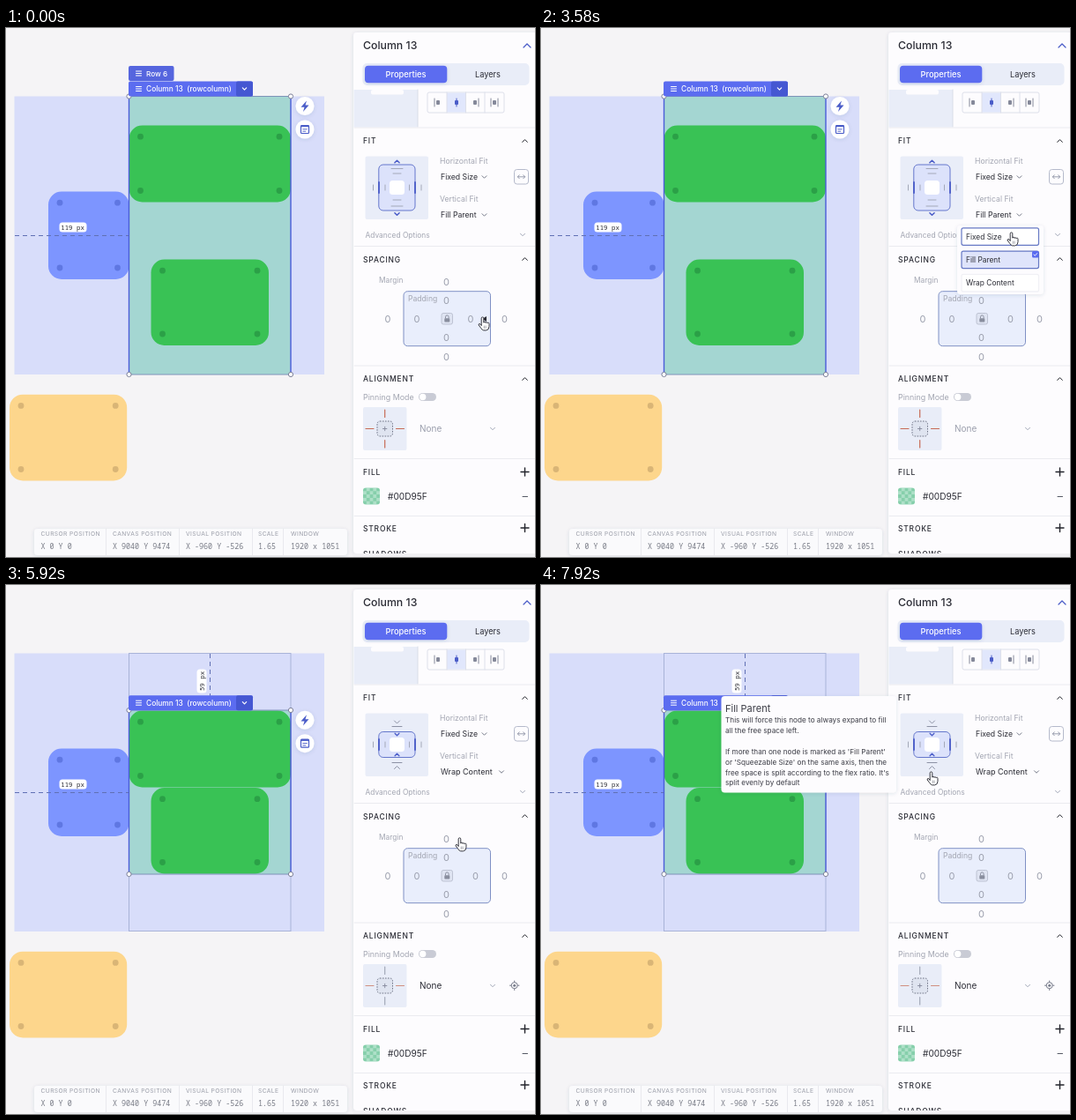
Animation of 600x600 px, one loop 8 s. Source, as an HTML page:

```html
<!DOCTYPE html>
<html lang="en">
<head>
<meta charset="utf-8">
<title>Column fit editor</title>
<style>
html, body { margin: 0; width: 100%; height: 100%; overflow: hidden; background: #f5f4f6; }
svg { display: block; width: 100vw; height: 100vh; font: 8.7px Inter, "Open Sans", sans-serif; fill: #2b2c35; }
text { white-space: pre; }
.head { font-size: 8.5px; font-weight: 500; letter-spacing: .8px; }
.soft { fill: #a3a6b2; }
.zero { font-size: 11px; fill: #9a9eac; text-anchor: middle; }
.mono { font: 8.4px "Noto Sans Mono", monospace; fill: #777a85; }
.caption { font-size: 6.7px; letter-spacing: .4px; fill: #9a9da8; }
.pill { font: 500 7.4px "Noto Sans Mono", monospace; text-anchor: middle; }
.tip { font-size: 8.2px; fill: #3b3c45; }
.title { font-size: 11px; fill: #3b3c45; }
.line { fill: none; stroke-linecap: round; stroke-linejoin: round; }
</style>
</head>
<body>
<svg id="stage" viewBox="0 0 600 600"></svg>
<script>
const BLUE = '#5b6cf0', INK = '#4a5cc8', PALE = '#e9edf8', GREY = '#a3a8b8';

// Markup helpers
const box = (x, y, w, h, fill, r = 0, more = '') =>
  `<rect x="${x}" y="${y}" width="${w}" height="${h}" rx="${r}" fill="${fill}" ${more}/>`;
const text = (x, y, words, cls = '', more = '') => `<text x="${x}" y="${y}" class="${cls}" ${more}>${words}</text>`;
const line = (d, color = GREY, width = 1, more = '') =>
  `<path class="line" d="${d}" stroke="${color}" stroke-width="${width}" ${more}/>`;
const dashes = d => line(d, '#6070b4', 1, 'stroke-dasharray="5 4" style="stroke-linecap:butt"');
const group = (id, body, more = '') => `<g id="${id}" ${more}>${body}</g>`;
const chevron = (x, y, dir = 1, color = '#777b8a', size = 2.5, width = 1) =>
  line(`M${x - size} ${y - dir * size / 2}l${size} ${dir * size}l${size} ${-dir * size}`, color, width);
const plus = (x, y, r, color, width) => line(`M${x - r} ${y}h${2 * r}M${x} ${y - r}v${2 * r}`, color, width);
const dot = (x, y, r, fill, more = '') => `<circle cx="${x}" cy="${y}" r="${r}" fill="${fill}" ${more}/>`;
const outline = (color, width = 1) => `stroke="${color}" stroke-width="${width}"`;
const shadow = 'filter="url(#shadow)"';

function card(x, y, w, h, fill, dotFill) {
  const dots = [[13, 12.7], [w - 13, 12.7], [13, h - 13], [w - 13, h - 13]];
  return box(x, y, w, h, fill, 15) + dots.map(([dx, dy]) => dot(x + dx, y + dy, 3.4, dotFill)).join('');
}

function selection(top, bottom) {
  const corners = [[139.5, top], [323, top], [139.5, bottom], [323, bottom]];
  return line(`M139.5 ${top}H323M139.5 ${bottom}H323`, '#7f92b8') +
    line(`M139.5 ${top}V${bottom}M323 ${top}V${bottom}`, '#4a5cd8', 1.4) +
    corners.map(([x, y]) => dot(x, y, 2.6, '#fff', outline('#7d8199'))).join('');
}

const burger = (x, y) => line(`M${x} ${y - 2.5}h6M${x} ${y}h6M${x} ${y + 2.5}h6`, '#fff');
const measure = (x, y, words, turn = 0) => `<g transform="translate(${x} ${y}) rotate(${turn})">` +
  box(-15 + (turn ? 1.5 : 0), -5.5, turn ? 27 : 31, 11, '#fff', 3.5) + text(0, 2.7, words, 'pill') + '</g>';

const columnTools = group('tools',
  box(139, 60.5, 141, 17, BLUE, 2) + box(261, 60.5, 19, 17, '#4557d2', 2) + burger(147.5, 69) +
  text(159, 72, 'Column 13  (rowcolumn)', '', 'fill="#fff" style="font-size:8.4px;font-weight:500"') +
  chevron(270.5, 69, 1, '#fff', 2.2, 1.2) +
  dot(339, 88.5, 10.5, '#fff', shadow) + dot(339, 115, 10.5, '#fff', shadow) +
  `<path d="M341 82.5l-6.5 7.2h4l-1.5 5.2l6.5-7.4h-4z" fill="${INK}"/>` +
  box(334.5, 110.5, 9, 9, 'none', 1, outline(INK, 1.2)) + box(334.5, 110.2, 9, 2, INK) +
  line('M336.8 114.8h4.5M336.8 117.2h3', INK, .9));

const canvas =
  box(9.5, 77.5, 351.5, 315.5, '#d8ddfa') +
  card(48, 185.5, 91.5, 99.5, '#7d95ff', '#5f77e2') +
  card(4, 415.7, 133.2, 97.8, '#fdd68c', '#d9b576') +
  group('fillColumn', box(139.5, 77.5, 183.5, 315.5, '#a4d6d2')) +
  group('wrapColumn',
    box(139.5, 77.5, 183.5, 315, 'none', 0, outline('#a9b3d8')) +
    dashes('M231.5 78V126') +
    measure(222, 109, '59 px', -90) + box(139.5, 142, 183.5, 186, '#a4d6d2')) +
  group('cardA', card(139.5, 110.5, 183.5, 87, '#39c255', '#2ba047')) +
  group('cardB', card(164.5, 262.5, 133.5, 97.5, '#39c255', '#2ba047')) +
  dashes('M10 235.5H139') + measure(75.5, 226, '119 px') +
  group('fillFrame', selection(77.5, 393)) + group('wrapFrame', selection(142, 328)) +
  columnTools +
  group('rowLabel', box(139, 43, 51.5, 17, '#5565de', 2) + burger(147.5, 51.5) +
    text(159, 54.5, 'Row 6', '', 'fill="#fff" style="font-size:8.2px;font-weight:500"'));

const status = [[39.5, 'CURSOR POSITION', 'X 0 Y 0'], [121, 'CANVAS POSITION', 'X 9040 Y 9474'],
  [204, 'VISUAL POSITION', 'X -960 Y -526'], [286, 'SCALE', '1.65'], [323, 'WINDOW', '1920 x 1051']];
const statusBar = box(32, 568, 355, 30, '#fafafc', 4, shadow) +
  line('M113.5 568V598M196.5 568V598M279.5 568V598M314.5 568V598', '#e9e9ee') +
  status.map(([x, name, value]) => text(x, 576, name, 'caption') + text(x, 591, value, 'mono')).join('');

const fitSketch = (top, height) =>
  box(422.8, top, 41.2, height, '#dce2fb', 5, outline('#6577cc')) +
  box(435, 173, 17, 16, '#fff', 3.5) +
  line('M416.5 178v6M430 178v6M457.5 178v6M471 178v6') +
  line('M423 175v12M464 175v12', INK, 1.8);

const fitWidget = box(407.5, 145.5, 71.5, 71.5, PALE, 2) +
  group('fillSketch', fitSketch(155, 52) + line('M437 159.5h13M439 165h9M439 195h9M437 202h13') +
    chevron(443.5, 151.5, -1, INK, 2.6, 1.5) + chevron(443.5, 211, 1, INK, 2.6, 1.5)) +
  group('wrapSketch', fitSketch(166.5, 29) + line('M438 160.5h11M438 201.5h11', '#8d92a5') +
    chevron(443.5, 155.5, 1, '#8d92a5', 3) + chevron(443.5, 207, -1, '#8d92a5', 3) +
    chevron(443.5, 169.5, 1, INK, 2.4, 1.3) + chevron(443.5, 192.5, -1, INK, 2.4, 1.3));

const headings = [['FIT', 128], ['SPACING', 262.5], ['ALIGNMENT', 398], ['FILL', 503.5], ['STROKE', 567.5], ['SHADOWS', 597]];
const zeros = [[499.5, 288], [433, 330], [565.5, 330], [499.5, 373], [499.5, 309], [466, 330], [499.5, 351]];
const alignCell = (x, i) => {
  const color = i === 1 ? INK : '#85899a';
  const bar = [x - 3.5, x, x + 3.5, x - 4][i];
  return line(`M${bar} 80v9${i === 3 ? `M${x + 4} 80v9` : ''}`, color) +
    box(x - 2 + [.5, 0, -.5, 0][i], 82, 4, 5, color, 1);
};

const panel = box(394, 5, 210, 591, '#fdfcfe', 4, shadow) +
  text(405, 24, 'Column 13', '', 'style="font-size:12.3px;font-weight:500"') +
  chevron(591, 20, -1, INK, 4, 1.2) +
  box(404.5, 40, 189, 25, PALE, 5) + box(407, 42.7, 93.3, 19.6, BLUE, 4, shadow) +
  text(453.5, 55.8, 'Properties', '', 'fill="#fff" text-anchor="middle" style="font-size:9.3px;font-weight:500"') +
  text(546.5, 55.8, 'Layers', '', 'text-anchor="middle" style="font-size:9.2px"') +
  box(394.5, 70, 72.5, 42.5, PALE) + box(414, 70, 37, 5.5, '#fdfcfe', 2) + line('M467 70V112', '#d9dce8') +
  box(478, 73, 87, 23, '#fdfcfe', 2, outline('#dde0ea')) + box(500, 73.5, 21.5, 22, '#e1e7fc') +
  line('M500 73V96M521.5 73V96M543 73V96', '#dde0ea') +
  [489.5, 511, 532.5, 554].map(alignCell).join('') +
  line('M395 113H600M395 247.5H600M395 383H600M395 488.5H600M395 553.5H600', '#ebebf0') +
  headings.map(([name, y]) => text(405, y + 3.2, name, 'head')).join('') +
  [128, 262, 398].map(y => chevron(588.5, y, -1, '#23242c', 2.8)).join('') +
  [503.5, 567].map(y => plus(588.5, y, 4.5, '#23242c', 1.4)).join('') +
  fitWidget +
  box(487.5, 158, 66.5, 22, '#e9eefb', 2, 'id="hoverH"') + box(487.5, 201, 66.5, 22, '#e9eefb', 2, 'id="hoverV"') +
  text(492, 154, 'Horizontal Fit', 'soft') + text(493, 172, 'Fixed Size') + chevron(542.5, 169) +
  text(492, 197, 'Vertical Fit', 'soft') +
  group('fillValue', text(493, 215, 'Fill Parent') + chevron(542.5, 212)) +
  group('wrapValue', text(493, 215, 'Wrap Content', '', 'style="font-size:9px"') + chevron(562, 212)) +
  box(576.5, 160.5, 16, 16.5, 'none', 3, outline('#b5bacb')) +
  line('M580.5 168.8h8M582.3 166.8l-2 2l2 2M586.7 166.8l2 2l-2 2', '#8d92a5', .9) +
  text(407.5, 238, 'Advanced Options', 'soft', 'style="font-size:8.4px"') + chevron(586, 234.5, 1, GREY) +
  text(423, 288.5, 'Margin', 'soft', 'style="font-size:8.4px"') +
  box(451, 298.7, 98.5, 62, '#e9eefc', 4.5, outline('#7f90c4')) +
  text(456, 309.5, 'Padding', 'soft', 'style="font-size:8.6px"') +
  zeros.map(([x, y]) => text(x, y + 4, 0, 'zero')).join('') +
  text(532.5, 334, 0, 'zero', 'id="rightZero"') +
  group('handle', '<path d="M540 330l5-3v6z"/>') +
  box(494, 323.5, 12.5, 12.5, '#dfe4f2', 2, outline('#b4b9ca', .8)) +
  box(497.3, 329.3, 6, 4.2, '#898e9e', .8) + line('M498.5 329v-1.3a1.8 1.8 0 0 1 3.6 0v1.3', '#898e9e') +
  text(405, 421.5, 'Pinning Mode', 'soft', 'style="font-size:8.9px"') +
  box(468, 414, 20, 9, '#c9cbd5', 4.5) + dot(472.7, 418.5, 3.7, '#fff') +
  box(405, 430, 49.5, 49, PALE, 2) +
  line('M429.7 433v8.5M429.7 467.5v8.5', '#c76a55', 1.2, 'id="pinV"') +
  line('M408 454.5h9M442.5 454.5h9', '#c76a55', 1.2, 'id="pinH"') +
  box(421, 446, 17.5, 17, '#dfe4f0', 3, outline('#6f7486') + ' stroke-dasharray="1.6 1.4"') +
  plus(429.7, 454.5, 2.2, '#858a9c', .9) +
  text(469, 458, 'None', '', 'id="none" style="font-size:10px"') + chevron(552, 454.5, 1, GREY) +
  group('pinTarget', dot(576.7, 454.2, 3.5, 'none', outline('#777b8a')) + dot(576.7, 454.2, 1.5, '#777b8a') +
    line('M576.7 449v1.5M576.7 458v1.5M571.5 454.2h1.5M580.5 454.2h1.5', '#777b8a')) +
  box(405, 521.5, 19, 19, 'url(#checker)', 3) +
  text(433, 534.5, '#00D95F', '', 'style="font-size:10.1px"') + line('M586 531.5h5.5', '#555965') +
  box(394, 596, 206, 4, '#f1f0f3');

const options = ['Fixed Size', 'Fill Parent', 'Wrap Content'];
const optionTop = i => 226.8 + i * 26.3;
const menu = group('menu', box(472, 224, 98, 78, '#fdfcfe', 4, shadow) +
  options.map((name, i) => {
    const y = optionTop(i), chosen = i === 1;
    return box(477, y, 87.5, 19.5, chosen ? '#dfe4fb' : '#fff', 2, `class="option" stroke-width="1.2"`) +
      text(482, y + 12.8, name, '', 'style="font-size:8.4px"') +
      (chosen ? box(557, y, 7.5, 7.5, BLUE, 1.5) + line(`M559 ${y + 3.8}l1.3 1.4l2.3-2.7`, '#fff', .9) : '');
  }).join(''));

const wrapTip = group('wrapTip', box(273, 269, 197, 41, '#fdfcfe', 4, shadow) +
  line('M279 282.5h8M283 277.5v10M281.3 279.3l1.7 1.7l1.7-1.7M281.3 286l1.7-1.7l1.7 1.7', '#4b4e59', 1.1) +
  text(291.5, 286.5, 'Wrap Content', 'title') +
  text(278, 301, 'Will wrap this node to be the size of its children.', 'tip'));

const tipLines = ['This will force this node to always expand to fill', 'all the free space left.', '',
  "If more than one node is marked as 'Fill Parent'", "or 'Squeezable Size' on the same axis, then the",
  "free space is split according to the flex ratio. It's", 'split evenly by default'];
const parentTip = group('parentTip', box(204.5, 126, 198.5, 109.5, '#fdfcfe', 4, shadow) +
  text(209, 143.5, 'Fill Parent', 'title') +
  tipLines.map((words, i) => text(209, 156 + i * 11.9, words, 'tip')).join(''));

const hand = group('cursor', `<path fill="#fff" stroke="#34353e" stroke-linejoin="round"
  d="M-1.3 9.6V1.2a1.3 1.3 0 0 1 2.6 0V6.2a1.1 1.1 0 0 1 2.2.2a1.1 1.1 0 0 1 2.1.4a1 1 0 0 1 1.9.6V10.5q0 4-3.4 4.4H1.2q-1.6-.3-2.7-2.2L-4.3 9q-.4-1.4.9-1.6q1.1.2 2.1 2.2z"/>` +
  line('M1.8 10v2.5M3.6 10v2.5', '#6a6c78', .6));

const defs = `<defs>
  <filter id="shadow" x="-20%" y="-20%" width="140%" height="140%">
    <feDropShadow dx="0" dy="1" stdDeviation="2" flood-color="#3a3f60" flood-opacity=".13"/></filter>
  <pattern id="checker" x="405" y="521.5" width="7.6" height="7.6" patternUnits="userSpaceOnUse">
    ${box(0, 0, 7.6, 7.6, '#aee0c8') + box(0, 0, 3.8, 3.8, '#86cfab') + box(3.8, 3.8, 3.8, 3.8, '#86cfab')}</pattern>
</defs>`;

const stage = document.getElementById('stage');
stage.innerHTML = defs + canvas + statusBar + panel + menu + wrapTip + parentTip + hand;
const el = id => document.getElementById(id);
const optionBoxes = [...document.querySelectorAll('.option')];

// Motion
const LOOP = 8000, MENU_OPEN = 2750, PICKED = 4450;
const path = [[0, 540.5, 328], [120, 540.5, 328], [800, 543, 177], [1750, 543, 177], [2350, 529.5, 209],
  [2800, 529.5, 209], [3250, 533.5, 232], [3620, 533.5, 232], [4000, 514.5, 287], [5900, 514.5, 287],
  [6550, 502.5, 260], [6780, 502.5, 260], [7450, 442.5, 212], [LOOP, 442.5, 212]];
const clamp = v => Math.max(0, Math.min(1, v));
const fade = (t, start, length = 150) => clamp((t - start) / length);

function pointer(t) {
  const i = path.findIndex(p => p[0] > t);
  const [t0, x0, y0] = path[i - 1], [t1, x1, y1] = path[i];
  const k = (t - t0) / (t1 - t0), e = k * k * (3 - 2 * k);
  return [x0 + (x1 - x0) * e, y0 + (y1 - y0) * e];
}

const show = (id, opacity) => el(id).setAttribute('opacity', +opacity);
const shift = (id, x, y) => el(id).setAttribute('transform', `translate(${x} ${y})`);

function render(t) {
  const [x, y] = pointer(t);
  const over = (left, top, w, h) => x >= left && x <= left + w && y >= top && y <= top + h;
  const wrapped = t >= PICKED, open = t >= MENU_OPEN && !wrapped;

  for (const part of ['Column', 'Frame', 'Sketch', 'Value']) {
    show('fill' + part, !wrapped);
    show('wrap' + part, wrapped);
  }
  shift('cardA', 0, wrapped ? 32 : 0);
  shift('cardB', 0, wrapped ? -32.5 : 0);
  shift('tools', 0, wrapped ? 64.7 : 0);
  show('rowLabel', t < 170);

  show('hoverH', over(487, 158, 67, 22));
  show('hoverV', !open && over(487, 201, 67, 22));
  const padding = over(533, 299, 17, 62);
  show('handle', padding);
  shift('rightZero', padding ? -5.5 : 0, 0);

  show('pinTarget', wrapped);
  el('none').setAttribute('fill', wrapped ? '#2b2c35' : '#9a9eac');
  el('pinV').setAttribute('stroke', wrapped ? '#a3a8b8' : '#c76a55');
  el('pinH').setAttribute('stroke', wrapped ? '#d08f80' : '#c76a55');

  show('menu', open ? fade(t, MENU_OPEN) : 0);
  optionBoxes.forEach((option, i) => {
    const hovered = over(477, optionTop(i), 87.5, 19.5);
    option.setAttribute('stroke', hovered || i === 1 ? '#6678c4' : '#f0f0f5');
  });
  show('wrapTip', open ? fade(t, 4070) : 0);
  show('parentTip', fade(t, 7600));
  shift('cursor', x, y);
}

function tick() {
  render(performance.now() % LOOP);
  requestAnimationFrame(tick);
}
tick();
</script>
</body>
</html>
```
